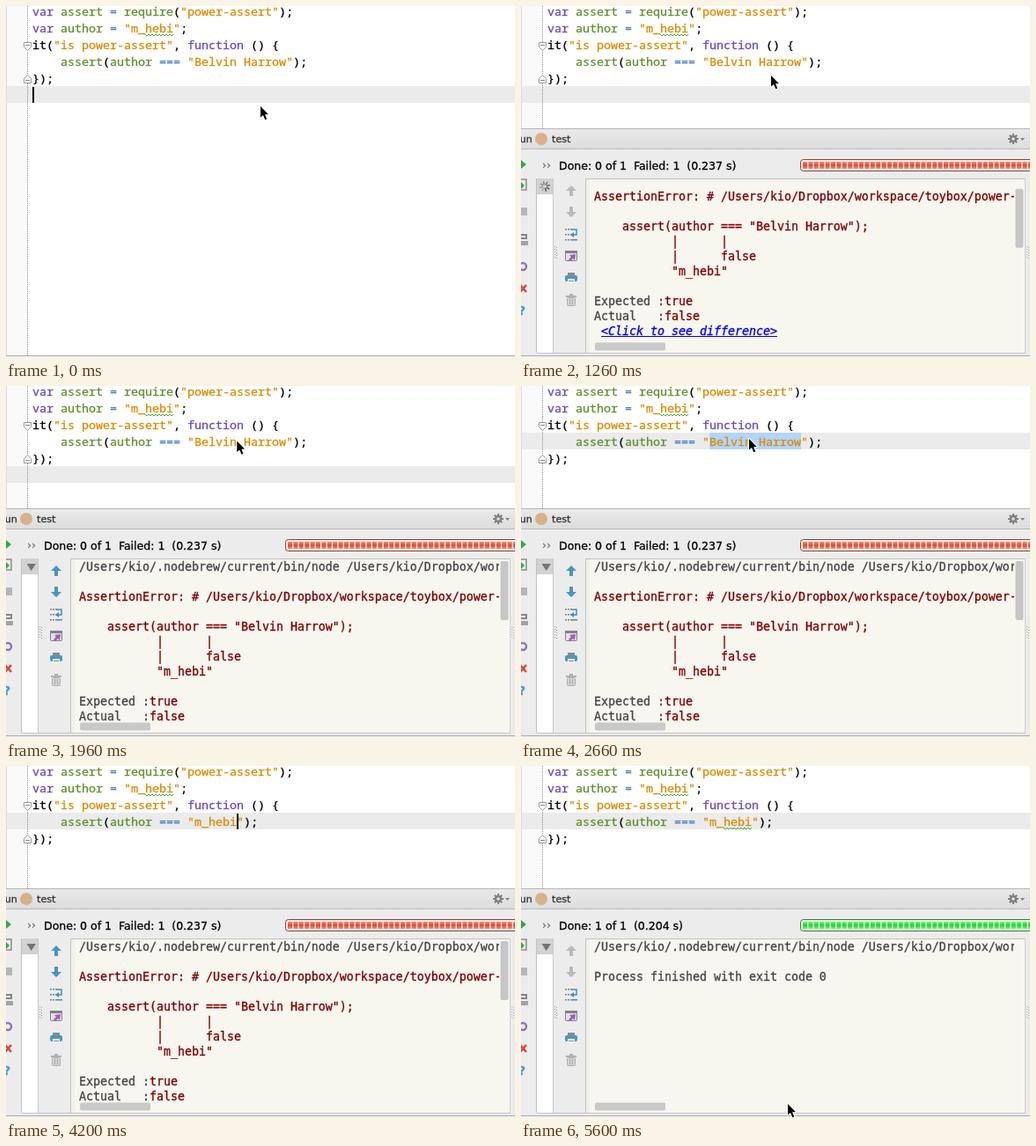
An HTML page with a canvas for the animation above (5740 ms loop, 578 by 400 pixels).

```html
<!DOCTYPE html>
<html lang="en">
<head>
<meta charset="utf-8">
<title>Assertion demo</title>
<style>
html, body { margin: 0; width: 100%; height: 100%; overflow: hidden; background: #fff; }
canvas { display: block; }
</style>
</head>
<body>
<canvas id="stage" width="578" height="400"></canvas>
<script>
const ctx = document.getElementById('stage').getContext('2d');
const LOOP = 5740, STEP = 140;
const USER = 'm_hebi', RIVAL = 'Belvin Harrow';
const HOME = '/Users/kio/', DIR = HOME + 'Dropbox/workspace/toybox/';
const CODE = '13.33px "Noto Sans Mono", monospace';
const MONO = '13.29px "DejaVu Sans Mono", monospace';
const UI = '12.5px "DejaVu Sans", sans-serif';
const SMALL = '11.2px "DejaVu Sans", sans-serif';
const KEY = '#6a48c0', NAME = '#5f8f2c', STR = '#dc8a00', OP = '#3b78c4', INK = '#000';
const ERR = '#7f0000', OUT = '#444', LINK = '#0000ee';

// Moments of the story, in ms
const at = { open: 840, start: 1120, fail: 1260, stack: 1400, top: 1680, arrows: 1820, click: 2100,
  word: 2380, select: 2520, clear: 2940, type: 3080, rerun: 4480, restart: 4760, pass: 4900 };
const pointer = [[0, 289, 114], [700, 289, 114], [1260, 284, 79], [1540, 272, 70], [2100, 259, 60],
  [4900, 259, 60], [5600, 303, 384]];

const stackLine = (call, path) =>
  [ERR, '    at ' + (call && call + ' ('), LINK, path || DIR + 'power-assert-simple/test.js:4:5'];
const firstLine = [OUT, HOME + '.nodebrew/current/bin/node ' + DIR + 'power-assert-simple'];
const failure = [
  firstLine, [],
  [ERR, 'AssertionError: # ' + DIR + 'power-assert-simple/test.js:4'], [],
  [ERR, `    assert(author === "${RIVAL}");`],
  [ERR, '           |      |'],
  [ERR, '           |      false'],
  [ERR, `           "${USER}"`], [],
  [OUT, 'Expected :', ERR, 'true'],
  [OUT, 'Actual   :', ERR, 'false'],
  [OUT, ' ', LINK, '<Click to see difference>'], [],
  ...['decoratedAssert', 'powerAssert', 'Context.<anonymous>', 'callFn', 'Test.Runnable.run',
    'Runner.runTest', '', 'next', '', 'next', 'Object._onImmediate'].map(call => stackLine(call)),
  stackLine('processImmediate [as _immediateCallback]', 'timers.js:330:15'), [],
  [OUT, 'Process finished with exit code 1']
];
const success = [firstLine, [], [OUT, 'Process finished with exit code 0']];

function box(x, y, w, h, color) {
  ctx.fillStyle = color;
  ctx.fillRect(x, y, w, h);
}

function pill(x, y, w, h, r, fill, stroke) {
  ctx.beginPath();
  ctx.roundRect(x, y, w, h, r);
  paint(fill, stroke);
}

function shape(points, fill, stroke, width) {
  ctx.beginPath();
  for (let i = 0; i < points.length; i += 2) ctx.lineTo(points[i], points[i + 1]);
  if (fill) ctx.closePath();
  paint(fill, stroke, width);
}

function circle(x, y, r, fill, stroke, width) {
  ctx.beginPath();
  ctx.arc(x, y, r, 0, 7);
  paint(fill, stroke, width);
}

function paint(fill, stroke, width = 1) {
  if (fill) { ctx.fillStyle = fill; ctx.fill(); }
  if (stroke) { ctx.strokeStyle = stroke; ctx.lineWidth = width; ctx.stroke(); }
}

function vertical(y, h, ...colors) {
  const g = ctx.createLinearGradient(0, y, 0, y + h);
  colors.forEach((color, i) => g.addColorStop(i / (colors.length - 1), color));
  return g;
}

// runs: color, text, color, text, ... The hairline stroke gives the slightly heavy smoothing.
function write(x, y, font, runs) {
  ctx.lineWidth = .3;
  for (let i = 0; i < runs.length; i += 2) {
    const [color, text] = [runs[i], runs[i + 1]], link = color === LINK;
    ctx.font = (link ? 'italic ' : '') + font;
    ctx.fillStyle = ctx.strokeStyle = color;
    ctx.fillText(text, x, y);
    ctx.strokeText(text, x, y);
    const width = ctx.measureText(text).width;
    if (link) box(x, y + 1, width, 1, LINK);
    x += width;
  }
}

function squiggle(x, y) {
  const points = [];
  for (let i = 0; i <= 16; i++) points.push(x + i * 2, y + (i % 2) * 2);
  shape(points, null, '#3fae3f');
}

function foldMark(y, dir) {
  shape([20.5, y - 4 * dir, 28.5, y - 4 * dir, 28.5, y + 1 * dir, 24.5, y + 5 * dir, 20.5, y + 1 * dir], '#fff', '#999');
  box(22, y - dir - .5, 5, 1, '#888');
}

function drawEditor(t) {
  box(0, 0, 578, 400, '#fff');
  box(0, 0, 24, 397, '#f9f9f9');
  box(0, t < at.click ? 91 : 53, 578, 19, '#ebebeb');
  box(0, 0, 1, 397, '#ddd');
  for (let y = 0; y < 397; y += 2) box(24, y, 1, 1, '#888');
  foldMark(45.5, 1);
  foldMark(83.5, -1);

  const typed = Math.max(0, Math.min(6, Math.floor((t - at.type) / STEP) + 1));
  const name = t < at.clear ? RIVAL : USER.slice(0, typed);
  if (t >= at.word && t < at.clear) box(214, 53, t < at.select ? 48 : 104, 19, '#b3d5fb');

  write(30, 11, CODE, [KEY, 'var ', NAME, 'assert ', OP, '= ', NAME, 'require', INK, '(', STR, '"power-assert"', INK, ');']);
  write(30, 30, CODE, [KEY, 'var ', NAME, 'author ', OP, '= ', STR, `"${USER}"`, INK, ';']);
  write(30, 49, CODE, [INK, 'it(', STR, '"is power-assert"', INK, ', ', KEY, 'function ', INK, '() {']);
  write(62, 68, CODE, [NAME, 'assert', INK, '(', NAME, 'author ', OP, '=== ', STR, `"${name}"`, INK, ');']);
  write(30, 87, CODE, [INK, '});']);

  squiggle(158, 32);
  if (t >= at.rerun) squiggle(230, 70);
  if (t < at.open) box(30, 92, 2, 18, '#000');
  if (t >= at.clear && t < at.rerun) box(214 + name.length * 8, 54, 2, 18, '#000');
}

function progressBar(state) {
  const [edge, back, light, dark] = {
    idle: ['#999', '#f0f0f0'],
    fail: ['#7c4a40', '#fbe6e0', '#f0907c', '#dc4a32'],
    pass: ['#3d7a3d', '#dcf9dc', '#7df07d', '#22cf35']
  }[state];
  pill(317.5, 174.5, 280, 13, 3, back, edge);
  if (state === 'idle') return;
  const fill = vertical(177, 8, light, dark, light);
  for (let x = 320; x < 578; x += 6.4) box(x, 177, 5, 8, fill);
}

function arrow(y, dir, color) {
  shape([57, y - 6 * dir, 63, y, 59, y, 59, y + 6 * dir, 55, y + 6 * dir, 55, y, 51, y], color);
}

function drawIcons(active) {
  // Run toolbar, cut off by the left edge
  shape([0, 175, 6, 180, 0, 185], '#35a845');
  shape([0, 197, 6, 197, 6, 209, 0, 209], null, '#8a8a8a', 1.5);
  shape([0, 200, 4, 204, 0, 208], '#35a845');
  box(0, 229, 7, 9, '#b5b5b5');
  box(0, 259, 7, 6, '#858585');
  box(0, 267, 8, 5, '#a2a2a2');
  box(0, 261, 5, 2, '#eee');
  circle(2, 296, 4, null, '#9274b4', 2.5);
  shape([-1, 317, 6, 325], null, '#dc4437', 2.5);
  shape([-1, 325, 6, 317], null, '#dc4437', 2.5);
  write(-3, 351, 'bold 14px "DejaVu Sans", sans-serif', ['#4b9cc9', '?']);

  // Console toolbar
  const tone = active ? '#4a94c0' : '#b9b9b9';
  arrow(210, 1, tone);
  arrow(234, -1, tone);
  for (const y of [253, 259, 265]) for (let x = 50; x < 58; x += 3) box(x, y, 2, 1.5, '#808080');
  shape([57, 254, 63, 254, 63, 260, 59, 260], null, '#3f8fc0', 1.5);
  shape([60, 257, 56, 260, 60, 263], '#3f8fc0');
  box(58, 265, 6, 1.5, '#3f8fc0');
  pill(50.5, 278.5, 13, 11, 1, '#e4e0e8', '#85808a');
  box(50, 278, 14, 3, '#85808a');
  shape([54, 288, 57, 285, 55, 283, 62, 282, 61, 289, 59, 287, 56, 290], '#a05fb5');
  box(53, 303, 8, 4, '#8a8a8a');
  pill(50, 306, 14, 7, 2, '#4b98bf');
  box(53, 310, 8, 5, '#f6f6f6');
  box(54, 312, 6, 1, '#888');
  pill(52.5, 331.5, 9, 9, 1, '#d2d2d2', '#b0b0b0');
  box(51, 329, 12, 2, '#b0b0b0');
  box(55, 327, 4, 2, '#b0b0b0');
  for (const x of [55, 58]) box(x, 333, 1, 6, '#aaa');
}

function drawGear() {
  for (let i = 0; i < 8; i++) {
    const a = i * Math.PI / 4, c = Math.cos(a), s = Math.sin(a);
    shape([559 + c * 3, 151 + s * 3, 559 + c * 6, 151 + s * 6], null, '#808080', 2);
  }
  circle(559, 151, 3, null, '#808080', 2.5);
  shape([567, 150, 572, 150, 569.5, 153], '#808080');
}

function drawConsole(lines, scroll) {
  ctx.save();
  ctx.beginPath();
  ctx.rect(78, 197, 482, 184);
  ctx.clip();
  lines.forEach((line, i) => write(83, 210 + i * 17 - scroll, MONO, line));
  ctx.restore();
  if (lines.length > 9) pill(561.5, 199 + scroll * .385, 9, 67, 2, '#c6c6c6');
  if (lines.length) pill(84, 382.5, 80, 9, 2, '#c9c9c9');
}

function drawPanel(t) {
  const second = t >= at.rerun;
  const done = second ? t >= at.pass : t >= at.fail;
  const running = second ? !done : t < at.stack;
  const state = !done ? 'idle' : second ? 'pass' : 'fail';
  const count = t < at.start ? 0 : t < at.fail ? 1 : t < at.stack ? 12 : failure.length;
  const lines = second ? success.slice(0, t < at.restart ? 0 : done ? 3 : 1) : failure.slice(0, count);
  const scroll = t < at.fail ? 0 : t < at.stack ? 23 : t < at.top ? 274 : 0;

  box(0, 139, 578, 261, '#ececec');
  box(0, 139, 578, 24, vertical(139, 24, '#eaeaea', '#dcdcdc'));
  box(0, 139, 578, 1, '#b4b4b4');
  box(0, 162, 578, 1, '#b8b8b8');
  write(-8.5, 155, SMALL, ['#333', 'Run']);
  circle(23, 151, 7, '#d6b189');
  write(35, 155, SMALL, ['#333', 'test']);
  drawGear();

  write(24, 185, UI, ['#777', '››']);
  if (done) write(43, 186, UI, [INK, second ? 'Done: 1 of 1  (0.204 s)' : 'Done: 0 of 1  Failed: 1  (0.237 s)']);
  progressBar(state);

  box(18, 196, 18, 198, '#fff');
  box(18, 196, 18, 18, '#d2d2d2');
  box(17, 196, 1, 198, '#c0c0c0');
  box(36, 196, 1, 198, '#c8c8c8');
  if (running) {
    for (let i = 0; i < 8; i++) {
      const a = i * Math.PI / 4 + t / 600, c = Math.cos(a), s = Math.sin(a);
      shape([27 + c * 2, 205 + s * 2, 27 + c * 6, 205 + s * 6], null, `rgba(60,60,60,${.3 + i * .08})`, 1.5);
    }
  } else shape([23.5, 202, 34, 202, 28.7, 210], '#747474');
  for (let y = 273; y < 288; y += 3) {
    box(38, y, 1, 1, '#999');
    box(40, y + 1, 1, 1, '#999');
    box(574, y, 1, 1, '#aaa');
    box(576, y + 1, 1, 1, '#aaa');
  }

  box(73, 196, 500, 198, '#f7f6ef');
  box(73, 196, 5, 198, '#f0f0ec');
  box(73, 196, 500, 1, '#c2c2c2');
  box(73, 196, 1, 198, '#c2c2c2');
  box(572, 196, 1, 198, '#d0d0d0');
  box(18, 394, 555, 1, '#c2c2c2');
  drawIcons(t >= at.arrows && !second);
  drawConsole(lines, scroll);
}

function drawPointer(t) {
  if (t >= at.clear && t < at.pass) return;
  const next = pointer.findIndex(p => p[0] > t);
  const i = next < 0 ? pointer.length - 1 : next;
  const [t0, x0, y0] = pointer[i - 1], [t1, x1, y1] = pointer[i];
  const k = Math.min(1, (t - t0) / (t1 - t0));
  ctx.save();
  ctx.translate(x0 + (x1 - x0) * k, y0 + (y1 - y0) * k);
  ctx.lineJoin = 'round';
  const tip = [0, 0, 0, 12.5, 3, 10, 5.2, 15.2, 7.2, 14.4, 5.1, 9.2, 8.8, 9];
  shape(tip, '#fff', '#fff', 2);
  shape(tip, '#000');
  ctx.restore();
}

function render(now) {
  const t = Math.floor(now % LOOP / STEP) * STEP;
  drawEditor(t);
  if (t >= at.open) drawPanel(t);
  box(0, 397, 578, 1, '#aaa');
  box(0, 398, 578, 2, '#f2f2f2');
  drawPointer(t);
  requestAnimationFrame(render);
}
requestAnimationFrame(render);
</script>
</body>
</html>
```
